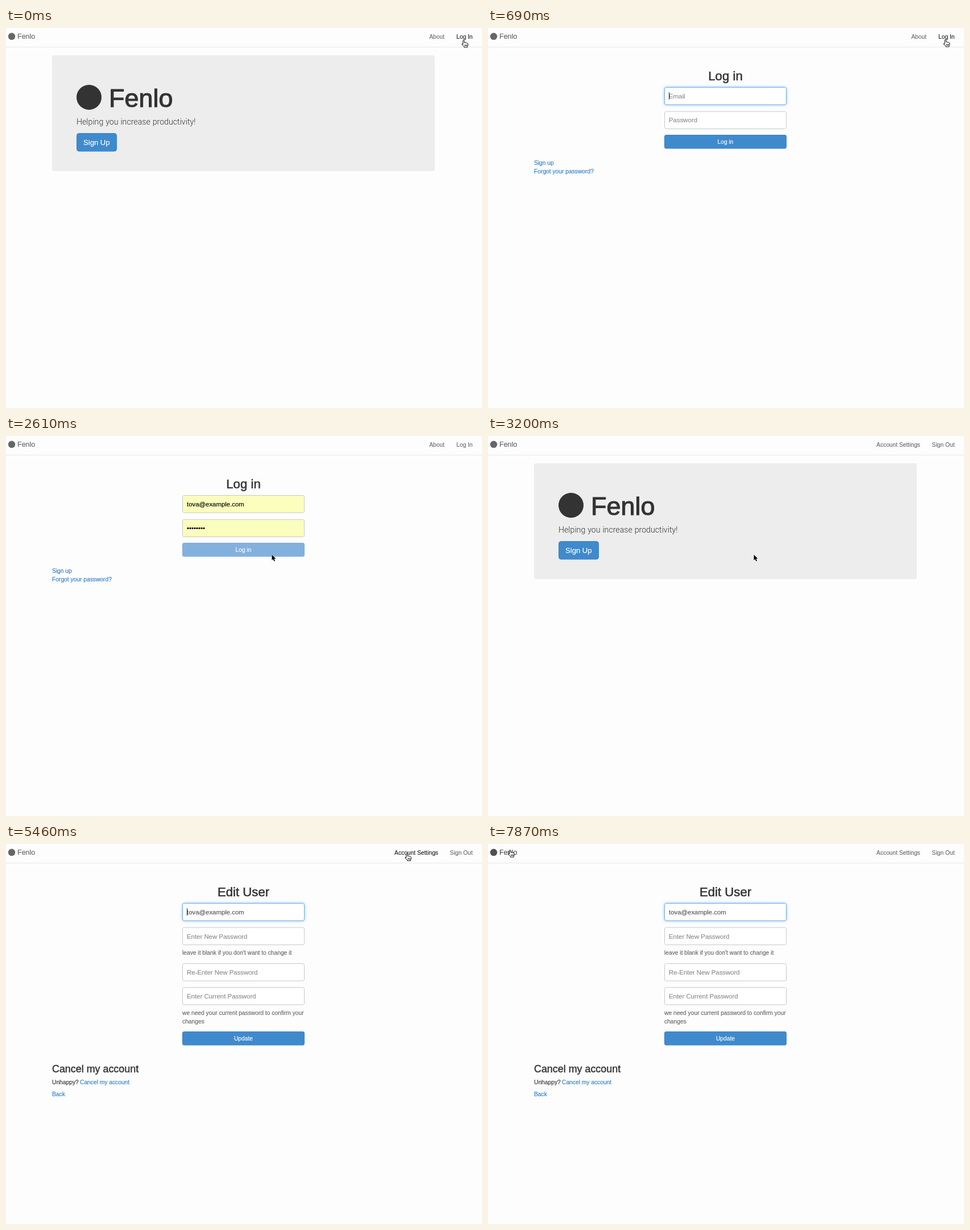
These frames come from a looping animation (837 px wide and 669 px high, 8000 ms). An HTML page:

```html
<!DOCTYPE html>
<html lang="en">
<head>
<meta charset="utf-8">
<title>Fenlo</title>
<style>
html, body { margin: 0; width: 100%; height: 100%; overflow: hidden; background: #fdfdfd; }
svg { display: block; width: 837px; height: 669px; }
text { font-family: "Liberation Sans", Arial, sans-serif; white-space: pre; }
.lead { font-family: Roboto, "Liberation Sans", sans-serif; font-weight: 300; stroke: none; }
.focus { filter: drop-shadow(0 0 2.5px rgba(102, 175, 233, .7)); }
</style>
</head>
<body>
<svg id="stage" viewBox="0 0 837 669"></svg>
<script>
const LOOP = 8000;
const INK = '#333', GREY = '#6c6c6c', HINT = '#8c8c8c', LINK = '#2d7cc6', BLUE = '#3f8acd';
const BODY = 10.25, FIELD = 11.4;
const EMAIL = 'tova@example.com';

// A thin stroke in the text colour gives the slightly heavier lettering.
const text = (x, y, size, fill, str, more = '', weight = .15) =>
  `<text x="${x}" y="${y}" font-size="${size}" fill="${fill}" stroke="${fill}" stroke-width="${weight}" ${more}>${str}</text>`;
const heading = (x, y, size, str, more = '') => text(x, y, size, INK, str, more, size / 42);
const rect = (x, y, w, h, r, fill, stroke = 'none', more = '') =>
  `<rect x="${x}" y="${y}" width="${w}" height="${h}" rx="${r}" fill="${fill}" stroke="${stroke}" ${more}/>`;
const field = (y, str = '', more = '') =>
  rect(310.5, y + .5, 214, 30.5, 3, '#fff', '#c8c8c8', more) + text(318, y + 20, FIELD, HINT, str);
const button = (y, str, more = '') =>
  rect(310.5, y + .5, 214, 23.5, 2.5, BLUE, '#3a83c6', more) +
  text(417.5, y + 16, BODY, '#fff', str, middle);
const group = (id, inner) => `<g id="${id}">${inner}</g>`;
const middle = 'text-anchor="middle"';
const end = 'text-anchor="end"';

document.getElementById('stage').innerHTML =
  rect(0, 0, 837, 669, 0, '#fdfdfd') +
  rect(0, 33, 837, 1, 0, '#e7e7e7') +
  group('brand',
    '<circle cx="10" cy="14.8" r="6.2" fill="currentColor"/>' +
    text(20, 19.3, 12.5, 'currentColor', 'Fenlo')) +
  group('guestNav',
    text(771, 18.8, BODY, GREY, 'About', end) +
    group('logInLink', text(820.5, 18.8, BODY, 'currentColor', 'Log In', end))) +
  group('userNav',
    group('accountLink', text(760, 18.8, BODY, 'currentColor', 'Account Settings', end)) +
    text(820.5, 18.8, BODY, GREY, 'Sign Out', end)) +
  group('home',
    rect(81, 48, 673, 204, 4, '#ededed') +
    `<circle cx="146" cy="122" r="22" fill="${INK}"/>` +
    heading(181, 138.5, 45, 'Fenlo') +
    text(124, 169.5, 14.2, INK, 'Helping you increase productivity!', 'class="lead" word-spacing=".4"') +
    rect(124.5, 185.5, 70, 31.5, 4, BLUE, '#3a83c6') +
    text(159.3, 206.3, 13.1, '#fff', 'Sign Up', middle)) +
  group('login',
    heading(417.5, 92.3, 22.2, 'Log in', middle) +
    field(104, '', 'id="emailBox"') + field(146.5, '', 'id="passBox"') +
    group('hints', text(318, 124, FIELD, HINT, 'Email') + text(318, 166.3, FIELD, HINT, 'Password')) +
    group('filled', text(318, 124, FIELD, '#000', EMAIL) + text(318, 166.3, FIELD, '#000', '•'.repeat(8))) +
    button(188, 'Log in', 'id="logInButton"') +
    text(81, 241.3, BODY, LINK, 'Sign up') +
    text(81, 255.6, BODY, LINK, 'Forgot your password?')) +
  group('edit',
    heading(417.5, 92.3, 22.2, 'Edit User', middle) +
    field(104, '', 'class="focus" style="stroke:#66afe9"') +
    text(318, 124, FIELD, '#555', EMAIL) +
    field(146.5, 'Enter New Password') +
    text(310, 195.3, BODY, '#666', "leave it blank if you don't want to change it") +
    field(210, 'Re-Enter New Password') +
    field(252, 'Enter Current Password') +
    text(310, 301.3, BODY, '#666', 'we need your current password to confirm your') +
    text(310, 315.7, BODY, '#666', 'changes') +
    button(330, 'Update') +
    heading(81, 402, 17.9, 'Cancel my account') +
    text(81, 423, BODY, INK, 'Unhappy?') +
    text(130, 423, BODY, LINK, 'Cancel my account') +
    text(81, 444.3, BODY, LINK, 'Back')) +
  rect(318, 113, 1, 13, 0, '#222', 'none', 'id="caret"') +
  group('pointer',
    '<path id="arrow" d="M0 0V9.8L2.2 7.7L3.8 11.5L5.5 10.8L4 7.1H6.9Z" fill="#000" stroke="#fff" stroke-width="1" paint-order="stroke"/>' +
    '<path id="hand" d="M-1 7V.8Q-1-.4 .2-.4T1.4.8V4Q1.6 3 2.7 3.3T3.6 4.4Q4 3.7 5 4T5.8 5Q6.2 4.4 7 4.8T7.8 6V8Q7.8 9.5 6.8 10.6V12H1V10.6L-2.6 7.6Q-3.2 6.6-2.4 6T-1 7ZM2.4 7.4V10M4.2 7.4V10M5.9 7.4V10" fill="#fff" stroke="#111" stroke-width="1" stroke-linejoin="round"/>');

const el = {};
document.querySelectorAll('[id]').forEach(node => el[node.id] = node);

const show = (node, on) => node.setAttribute('display', on ? 'inline' : 'none');
const within = (v, from, to) => v >= from && v < to;
const ease = p => p * p * (3 - 2 * p);

// Pointer moves: first step, last step, number of steps, end position.
const START = [804.5, 22];
const MOVES = [
  [150, 390, 2, 804, 21],
  [1730, 2610, 7, 467.5, 209],
  [3650, 3820, 2, 470, 200],
  [4120, 5010, 7, 704.7, 17.5],
  [7420, 7420, 1, 690, 24],
  [7570, 7570, 1, 311, 9],
  [7720, 7720, 1, 45, 2],
  [7870, 7870, 1, 38.5, 11]
];

function pointerAt(t) {
  let [x, y] = START;
  for (const [from, to, steps, tx, ty] of MOVES) {
    if (t < from) break;
    const gap = (to - from) / Math.max(1, steps - 1);
    const n = t >= to ? steps : Math.floor((t - from) / gap) + 1;
    const p = ease(n / steps);
    x += (tx - x) * p;
    y += (ty - y) * p;
  }
  return [x, y];
}

function draw(t) {
  const page = t < 690 ? 'home' : t < 3200 ? 'login' : t < 5460 ? 'home' : 'edit';
  const signedIn = t >= 3200;
  const filled = t >= 990;
  const sent = t >= 2610;
  for (const name of ['home', 'login', 'edit']) show(el[name], name === page);
  show(el.guestNav, !signedIn);
  show(el.userNav, signedIn);

  const [x, y] = pointerAt(t);
  const inNav = y < 33;
  const overLogIn = !signedIn && inNav && x > 785;
  const overAccount = signedIn && inNav && within(x, 692, 770);
  const overBrand = inNav && t >= 7870;
  const overButton = page === 'login' && !sent && within(x, 310, 525) && within(y, 188, 213);
  const hand = overLogIn || overAccount || overBrand || overButton;
  el.pointer.setAttribute('transform', `translate(${x} ${y})`);
  show(el.hand, hand);
  show(el.arrow, !hand);

  el.logInLink.setAttribute('color', overLogIn ? '#222' : GREY);
  el.accountLink.setAttribute('color', overAccount ? '#222' : GREY);
  el.brand.setAttribute('color', overBrand ? '#505050' : '#666');

  show(el.hints, !filled);
  show(el.filled, filled);
  const tint = filled ? '#faffbd' : '#fff';
  el.emailBox.setAttribute('fill', tint);
  el.passBox.setAttribute('fill', tint);
  el.emailBox.setAttribute('stroke', sent ? '#c8c8c8' : '#66afe9');
  el.emailBox.setAttribute('class', sent ? '' : 'focus');
  el.logInButton.setAttribute('fill', sent ? '#83b1de' : overButton ? '#3071a9' : BLUE);
  el.logInButton.setAttribute('stroke', sent ? '#7caad8' : '#3a83c6');

  const blink = within(t, 690, 1440) || within(t, 1940, 2463) ||
    within(t, 5460, 5940) || within(t, 6380, 6980) || within(t, 7420, 7870);
  show(el.caret, blink);
  el.caret.setAttribute('x', page === 'login' && filled ? 418 : 318);
}

const began = performance.now();
function tick() {
  draw((performance.now() - began) % LOOP);
  requestAnimationFrame(tick);
}
tick();
</script>
</body>
</html>
```
